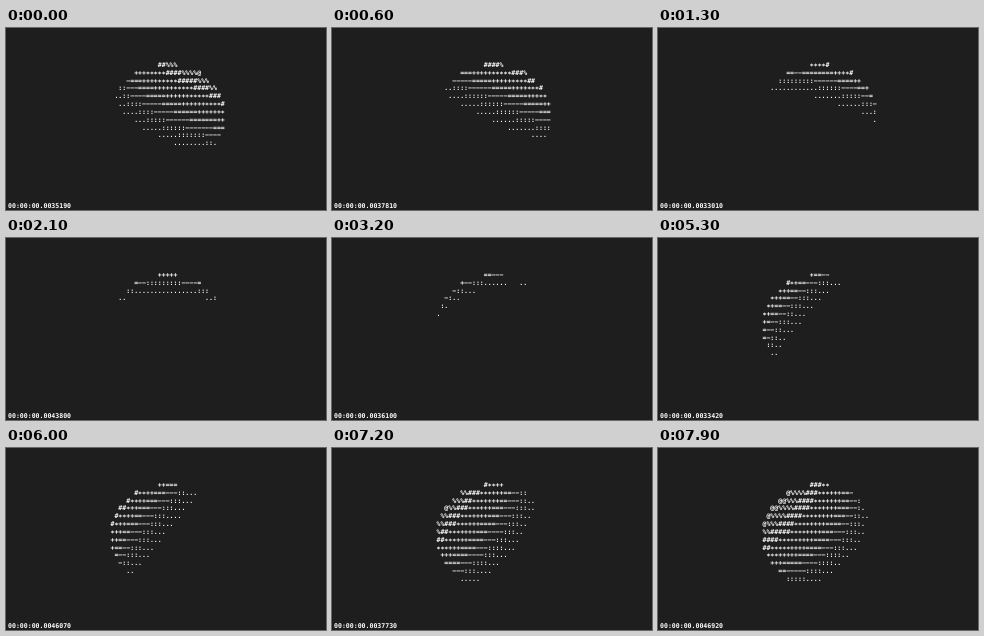
Write an HTML page that moves like this. It is 320 px wide and 182 px high and loops after 8000 ms.

```html
<!DOCTYPE html>
<html lang="en">
<head>
<meta charset="utf-8">
<title>ASCII sphere</title>
<style>
  html, body { margin: 0; width: 100%; height: 100%; overflow: hidden; background: #1e1e1e; }
  pre {
    position: absolute; left: 2px; top: 2.6px; margin: 0; color: #fff;
    font: bold 6.56px/7.83px "DejaVu Sans Mono", monospace;
    text-rendering: geometricPrecision; font-variant-ligatures: none;
  }
</style>
</head>
<body>
<pre id="screen"></pre>
<script>
const LOOP = 8000, STEP = 100;
const COLS = 80, ROWS = 22, CX = 40, CY = 10.5, RX = 14.56, RY = 6.62;
const RAMP = " .:−=+∗#%@"; // minus and asterisk operators sit on the middle of the line

// A lamp swaying sideways and in depth above the sphere
function light(sec) {
  const x = -.42 + 1.02 * Math.cos(.45 * sec + .15);
  const z = .49 - .97 * Math.cos(.45 * (sec - 3.35));
  const scale = .97 / Math.hypot(x, 1, z);
  return [x * scale, scale, z * scale];
}

// Sphere of radius 1 seen from distance 2
function shade(col, row, [lx, ly, lz]) {
  const x = (col - CX) / RX, y = (CY - row) / RY, q = x * x + y * y;
  if (q >= 1) return " ";
  const t = (2 - Math.sqrt(1 - q)) / (1 + q / 3), side = t / Math.sqrt(3);
  const lum = side * (x * lx + y * ly) + (2 - t) * lz;
  return RAMP[Math.max(0, Math.min(9, Math.floor(lum * 10)))];
}

// Jittery reading of the time spent on one step
function timer(step) {
  const noise = Math.abs(Math.sin(step * 127.1 + 3) * 43758.5) % 1;
  const value = 32000 + Math.floor(noise * 1600) * 10;
  return "00:00:00." + String(value).padStart(7, "0");
}

const screen = document.getElementById("screen");
let shown = -1;

function draw(now) {
  const step = Math.floor(now % LOOP / STEP);
  if (step !== shown) {
    shown = step;
    const dir = light(step * STEP / 1000);
    const lines = Array.from({ length: ROWS }, (_, row) =>
      Array.from({ length: COLS }, (_, col) => shade(col, row, dir)).join(""));
    screen.textContent = [...lines, timer(step)].join("\n");
  }
  requestAnimationFrame(draw);
}
draw(performance.now());
</script>
</body>
</html>
```
